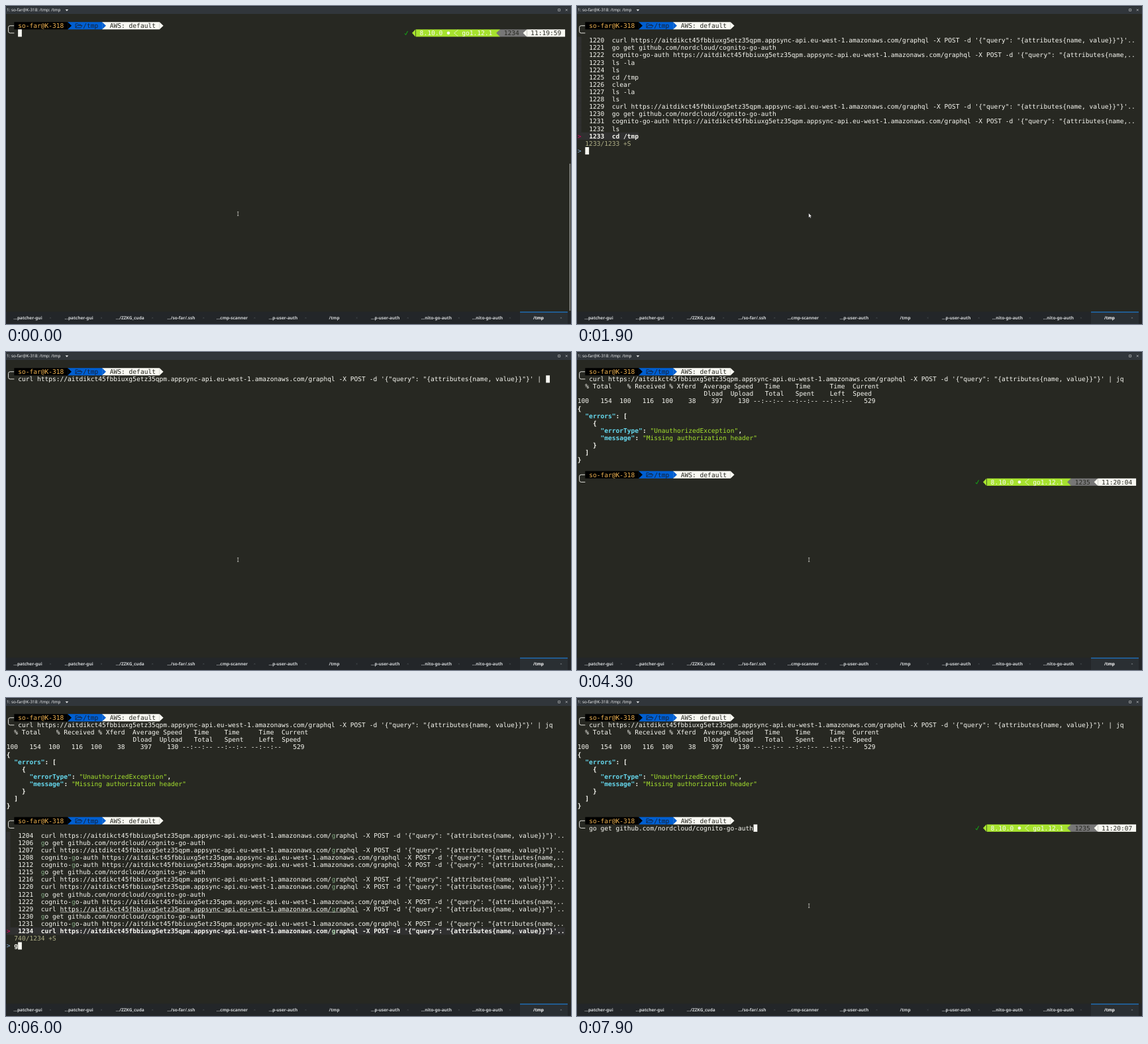
These frames come from a looping animation (853x480 px, 8000 ms). An HTML page:

```html
<!DOCTYPE html>
<html lang="en">
<head>
<meta charset="utf-8">
<title>Terminal history search</title>
<style>
  html, body { margin: 0; width: 100%; height: 100%; overflow: hidden; background: #272822; }
  svg { display: block; width: 853px; height: 480px; }
  text { white-space: pre; text-rendering: geometricPrecision; }
  .mono { font: 9.595px "DejaVu Sans Mono", monospace; fill: #f8f8f2; }
  .b { font-weight: 700; }
  .ui { font: 6.27px "Noto Sans", sans-serif; fill: #eff0f1; }
  .tab { font: 700 6.5px "Noto Sans", sans-serif; fill: #d3d6d8; text-anchor: middle; }
</style>
</head>
<body>
<svg viewBox="0 0 853 480" xmlns="http://www.w3.org/2000/svg">
  <rect width="853" height="480" fill="#272822"/>
  <g id="frame"></g>
  <g id="screen"></g>
  <g id="pointer"></g>
</svg>
<script>
const LOOP = 8000, CW = 5.776, RH = 11.107;
const USER = "so-far", HOST = "K-318";
const C = { bg: "#272822", fg: "#f8f8f2", blue: "#005fd2", green: "#a6e22e", grey: "#767676",
  key: "#66d9ef", hit: "#87af87", curHit: "#afd7af", line: "#303030", info: "#afaf87",
  ask: "#87afd7", mark: "#d7005f", name: "#f0b452" };

const X = col => 0.8 + CW * col;
const Y = row => 13.1 + RH * row;
const esc = s => s.replace(/&/g, "&amp;").replace(/</g, "&lt;").replace(/>/g, "&gt;");
const put = (row, col, s, fill = C.fg, bold = false) =>
  `<text class="mono${bold ? " b" : ""}" x="${X(col).toFixed(2)}" y="${(Y(row) + 8.8).toFixed(2)}" fill="${fill}" style="fill:${fill}">${esc(s)}</text>`;
const block = (row, col, n, fill) =>
  `<rect x="${X(col)}" y="${Y(row)}" width="${CW * n}" height="${RH}" fill="${fill}"/>`;
const path = (d, fill, stroke = "none", w = 1) =>
  `<path d="${d}" fill="${fill}" stroke="${stroke}" stroke-width="${w}"/>`;
const arrowR = (row, col, fill) => path(`M${X(col)} ${Y(row)}l${CW} ${RH / 2}l${-CW} ${RH / 2}z`, fill);
const arrowL = (row, col, fill) => path(`M${X(col + 1)} ${Y(row)}l${-CW} ${RH / 2}l${CW} ${RH / 2}z`, fill);
const cursor = (row, col) => block(row, col, 1, C.fg);

// Shell history
const URL_ = "https://aitdikct45fbbiuxg5etz35qpm.appsync-api.eu-west-1.amazonaws.com/graphql";
const ARGS = ` ${URL_} -X POST -d '{"query": "{attributes{name, value}}"}'`;
const PIPE = " | jq";
const CURL = "curl" + ARGS;
const GOGET = "go get github.com/nordcloud/cognito-go-auth";
const HOOK = "curl https://hooks.slack.com/services/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";
const commit = s => `git commit -m "${s}"`;
const history = {
  67: HOOK, 68: HOOK + " -v",
  908: "go test ./...", 1088: "go test ./...", 1110: "go test ./...",
  1185: "go test -coverprofile fmt",
  976: "go get bitbucket.org/nordcloud/cognito-authorizer/pkg/request/auth",
  1121: "go get github.com:nordcloud/cognito-go-auth.git",
  1036: commit("Patch customer attributes"),
  1039: commit("customers list api fix"),
  1086: commit("Query to list customers and accounts availale for the user"),
  1091: commit("Removed roles from the available customers query"),
  1094: commit("Find not loaded customers"),
  1097: commit("Added option to return customer without accounts"),
  1203: CURL
};
const fill = (ids, cmd) => ids.split(" ").forEach(id => history[id] = cmd);
fill("1204 1207 1216 1220 1229 1234", CURL + PIPE);
fill("1122 1123 1182 1187 1206 1215 1221 1230", GOGET);
fill("1208 1212 1222 1231", "cognito-go-auth" + ARGS);
const plain = ["ls", "cd /tmp", "clear", "ls -la"];
const command = id => history[id] || plain[id % 4];

const latest = last => Array.from({ length: 14 }, (_, i) => last - 13 + i);
const pick = test => Object.keys(history).map(Number).filter(test);
const recent = pick(id => id > 1202 && id < 1234);
const withG = pick(id => id > 1203);
const customers = [...pick(id => id > 1030 && id < 1100 && id !== 1088), 67, 68,
  ...pick(id => id > 1202 && id < 1234 && command(id).startsWith("curl"))];
const goOnly = pick(id => id > 1100 && id !== 1185 && id < 1234 && !command(id).startsWith("curl"));
const goGet = [908, 1088, 1110, 1185, 976, ...pick(id => id > 1120 && command(id).startsWith("go get"))];

// Each search step: start time, query, list, matches, total
const steps = [
  [1500, "", latest(1233), 1233, 1233],
  [2000, "c", recent, 1015, 1233],
  [2150, "cu", customers, 408, 1233],
  [2300, "cur", customers, 272, 1233],
  [5200, "", latest(1234), 1234, 1234],
  [5800, "g", withG, 740, 1234],
  [6100, "go", goOnly, 583, 1234],
  [6200, "go ", goOnly, 583, 1234],
  [6300, "go g", goOnly, 583, 1234],
  [6400, "go ge", goGet, 411, 1234],
  [6550, "go get", goGet, 390, 1234]
];

// Positions matched by each search term, preferring word starts
function hits(text, query) {
  const found = new Set();
  for (const term of query.split(" ").filter(Boolean)) {
    for (let n = term.length; n > 0; n--) {
      const m = new RegExp("(^|[^a-z0-9])" + term.slice(0, n)).exec(text);
      if (!m) continue;
      let at = m.index + m[1].length;
      for (let i = 0; i < n; i++) found.add(at++);
      for (const ch of term.slice(n)) {
        at = text.indexOf(ch, at);
        if (at < 0) break;
        found.add(at++);
      }
      break;
    }
  }
  return found;
}

function item(row, id, query, current) {
  let text = command(id);
  if (text.length > 137) text = text.slice(0, 135) + "..";
  const set = hits(text, query);
  let out = block(row, 0, current ? 9 + text.length : 1, C.line);
  if (current) out += put(row, 0, ">", C.mark);
  out += put(row, 3, String(id).padStart(4) + (id === 1185 ? "*" : ""), C.fg, current);
  for (let i = 0; i < text.length;) {
    const on = set.has(i);
    let j = i + 1;
    while (j < text.length && set.has(j) === on) j++;
    out += put(row, 9 + i, text.slice(i, j), on ? (current ? C.curHit : C.hit) : C.fg, current);
    i = j;
  }
  return out;
}

function finder(row, [, query, ids, count, total]) {
  let out = ids.map((id, i) => item(row + i, id, query, i === ids.length - 1)).join("");
  out += put(row + 14, 2, `${count}/${total} +S`, C.info);
  out += put(row + 15, 0, ">", C.ask) + put(row + 15, 2, query, C.fg, true);
  out += cursor(row + 15, 2 + query.length);
  if (query === "g") out += path(`M${X(14)} ${Y(row + 10) + 10.2}H${X(92)}`, "none", C.fg, 0.6);
  return out;
}

function prompt(row) {
  const a = Y(row) + RH / 2, b = a + RH, f = Y(row);
  return path(`M12.4 ${a}H6.2Q3.6 ${a} 3.6 ${a + 2.6}V${b - 2.6}Q3.6 ${b} 6.2 ${b}H12.4`, "none", C.fg, 0.9) +
    block(row, 2, 14, "#000") + block(row, 16, 9, C.blue) + block(row, 25, 15, C.fg) +
    arrowR(row, 16, "#000") + arrowR(row, 25, C.blue) + arrowR(row, 40, C.fg) +
    put(row, 3, `${USER}@${HOST}`, C.name) +
    path(`M105 ${f + 8.6}V${f + 2.6}h3.2l1 1.2h3.8v1.5M105 ${f + 8.6}l2.2-3.3h7.8l-2.2 3.3z`, "none", "#142035", 0.8) +
    put(row, 20, "/tmp", "#142035") + put(row, 27, "AWS: default", C.bg);
}

function status(row, number, time) {
  const m = Y(row) + RH / 2;
  return path(`M602 ${m + 0.5}l1.5 2.3l3-5.8`, "none", "#12b512", 1) +
    path(`M618.2 ${Y(row)}l-5.2 ${RH / 2}l5.2 ${RH / 2}z`, C.green) +
    block(row, 107, 22, C.green) + arrowL(row, 128, C.grey) + block(row, 129, 7, C.grey) +
    arrowL(row, 135, C.fg) + block(row, 136, 10, C.fg) +
    put(row, 108, "8.10.0") + `<circle cx="${X(115.5)}" cy="${m}" r="2.3" fill="${C.fg}"/>` +
    path(`M${X(118)} ${Y(row) + 0.8}L${X(117)} ${m}L${X(118)} ${Y(row) + RH - 0.8}`, "none", C.fg, 0.7) +
    put(row, 119, "go1.12.1") + put(row, 130, number, C.bg) + put(row, 137, time, C.bg);
}

const header = () =>
  put(3, 0, "  % Total    % Received % Xferd  Average Speed   Time    Time     Time  Current") +
  put(4, 33, "Dload  Upload   Total   Spent    Left  Speed");

function pair(row, key, value, comma) {
  const at = 6 + key.length + 2;
  return put(row, 6, `"${key}"`, C.key, true) + put(row, at, ":", C.fg, true) +
    put(row, at + 2, `"${value}"`, C.green) +
    (comma ? put(row, at + value.length + 4, ",", C.fg, true) : "");
}

function response() {
  const brace = (row, col, s) => put(row, col, s, C.fg, true);
  return put(5, 0, "100   154  100   116  100    38    397    130 --:--:-- --:--:-- --:--:--   529") +
    brace(6, 0, "{") + put(7, 2, '"errors"', C.key, true) + brace(7, 10, ": [") + brace(8, 4, "{") +
    pair(9, "errorType", "UnauthorizedException", true) +
    pair(10, "message", "Missing authorization header", false) +
    brace(11, 4, "}") + brace(12, 2, "]") + brace(13, 0, "}");
}

const between = (t, a, b) => t >= a && t < b;

function screen(t) {
  const step = steps.filter(s => s[0] <= t).pop();
  let out = prompt(1);
  if (t < 1500) {
    out += status(2, "1234", "11:19:59");
    if (!between(t, 400, 900)) out += cursor(2, 3);
    if (t < 900) out += `<rect x="850.8" y="238" width="1.2" height="222" fill="#a3a49f"/>`;
    return out;
  }
  if (t < 2800) return out + finder(3, step);

  const typed = CURL + PIPE.slice(0, Math.max(0, Math.floor((t - 2900) / 100)));
  out += put(2, 3, typed);
  if (t < 3500) return out + cursor(2, 3 + typed.length);
  if (t >= 3600) out += header();
  if (t < 3800) return out + cursor(t < 3600 ? 3 : 5, 0);

  out += response() + prompt(15);
  if (t < 5200) {
    out += status(16, "1235", "11:20:04");
    return between(t, 4200, 4700) ? out : out + cursor(16, 3);
  }
  if (t < 7100) return out + finder(17, step);
  out += put(16, 3, GOGET) + status(16, "1235", "11:20:07");
  return between(t, 7400, 7900) ? out : out + cursor(16, 3 + GOGET.length);
}

function pointer(t) {
  if (between(t, 5800, 6100)) return "";
  if (between(t, 1300, 2800))
    return path("M349.8 312.7v6.7l1.5-1.3l1 2.1l1.1-.5l-1-2.1h2z", "#fff", "#111", 0.4);
  return path("M349 310.8h2.4M349 316.4h2.4M350.2 310.8v5.6", "none", "#d6d6d0", 0.7);
}

function windowFrame() {
  const names = ["...patcher-gui", "...patcher-gui", ".../ZZKG_cuda", `.../${USER}/.ssh`, "...cmp-scanner",
    "...p-user-auth", "/tmp", "...p-user-auth", "...nito-go-auth", "...nito-go-auth", "/tmp"];
  const cross = (x, y, r, c) => path(`M${x - r} ${y - r}l${2 * r} ${2 * r}m0 ${-2 * r}l${-2 * r} ${2 * r}`, "none", c, 0.6);
  let out = `<rect width="853" height="12" fill="#31363b"/><rect width="853" height=".6" fill="#1d2023"/>` +
    `<text class="ui" x="1" y="8.4">1: ${USER}@${HOST}: /tmp: /tmp</text>` +
    path("M89.6 5.2h4.6l-2.3 2.5z", "#eff0f1") +
    path("M833.6 4.5h3v3h-3z", "none", "#d8dadb", 0.6) + cross(846.3, 6, 1.4, "#e4e6e7") +
    `<rect y="461.5" width="853" height="18.5" fill="#232629"/>` +
    `<rect x="776" y="461.5" width="72" height="18.5" fill="#2a2f33"/>` +
    `<rect x="776" y="461.4" width="72" height="1.3" fill="#1f74c4"/>` +
    `<rect y="12" width=".7" height="449.5" fill="#1b1d1a"/>`;
  names.forEach((name, i) => {
    const x = 33 + 77.1 * i, on = i === 10;
    out += `<text class="tab" x="${x}" y="473"${on ? ' style="fill:#fff"' : ""}>${name}</text>` +
      cross(x + 34, 470.8, 0.9, on ? "#8b9094" : "#50565a");
  });
  return out;
}

const layer = id => document.getElementById(id);
const shown = {};
function update(id, html) {
  if (shown[id] === html) return;
  shown[id] = html;
  layer(id).innerHTML = html;
}

function draw(now) {
  const t = Math.max(0, now - start) % LOOP;
  update("screen", screen(t));
  update("pointer", pointer(t));
  requestAnimationFrame(draw);
}

layer("frame").innerHTML = windowFrame();
const start = performance.now();
draw(start);
</script>
</body>
</html>
```
